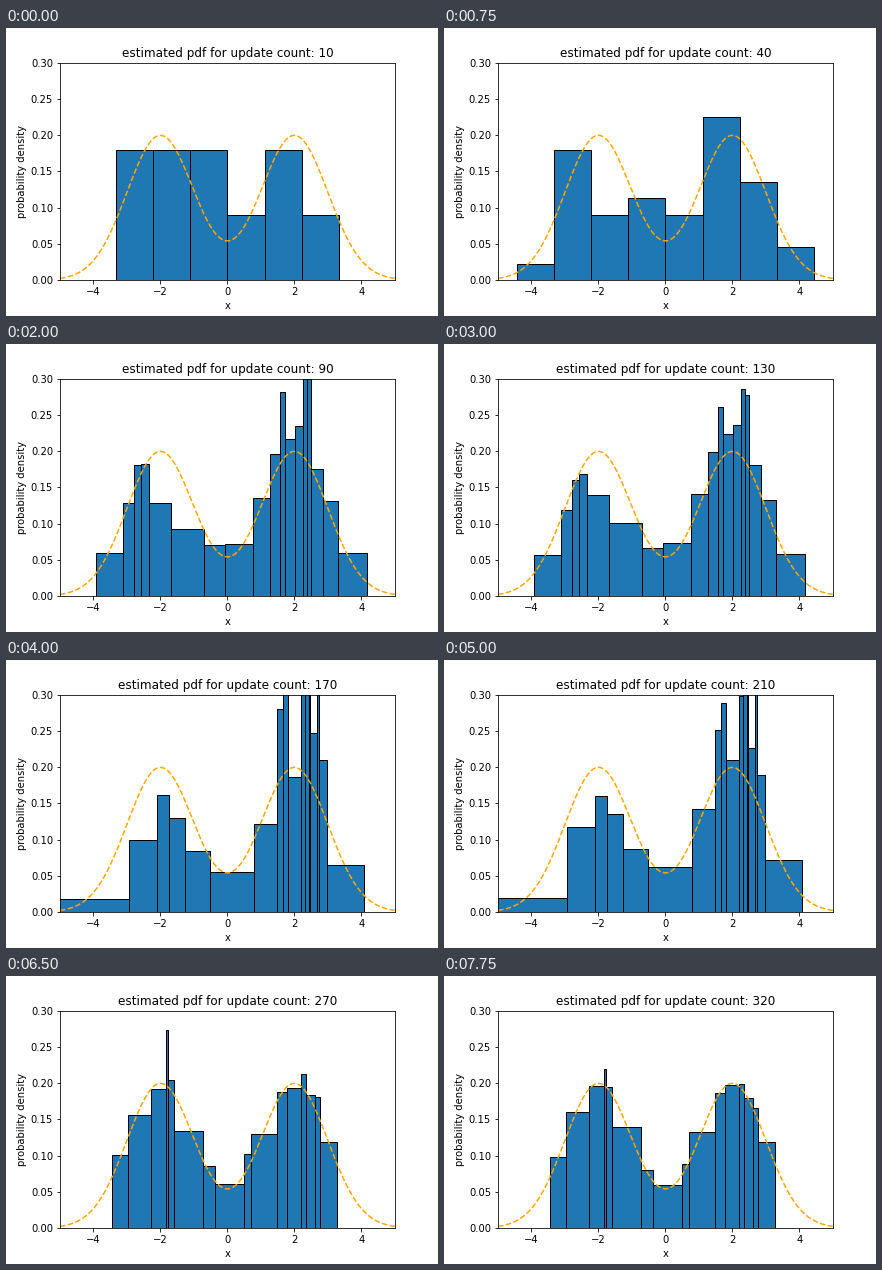
A matplotlib script for the animation above (8000 ms loop, 432 by 288 pixels).

```python
from math import erf, sqrt

import numpy as np
import matplotlib.pyplot as plt
from matplotlib.animation import FuncAnimation

STEP = 10
FRAMES = 32

plt.rcParams.update({"font.family": "DejaVu Sans", "font.size": 10})

# Sample tallies in the uniform bins after 10 and after 40 updates.
UNIFORM = np.arange(-4, 5) * 10 / 9
EARLY = np.array([0, 2, 2, 2, 1, 2, 1, 0])
LATE = np.array([1, 8, 4, 5, 4, 10, 6, 2])

# Each rebinning: update count, share of the left hump, prior weight, edges.
STAGES = [
    (50, 0.4, 26, [-3.92, -3.11, -2.78, -2.57, -2.34, -1.68, -0.70, -0.07,
                   0.77, 1.27, 1.57, 1.72, 2.02, 2.26, 2.38, 2.50, 2.86,
                   3.30, 4.17]),
    (150, 0.4, 26, [-6.5, -2.93, -2.10, -1.74, -1.26, -0.52, 0.80, 1.48,
                    1.66, 1.80, 2.20, 2.33, 2.43, 2.47, 2.68, 2.74, 2.98,
                    4.08]),
    (250, 0.5, 2, [-3.44, -2.96, -2.28, -1.83, -1.77, -1.59, -0.73, -0.36,
                   0.50, 0.71, 1.48, 1.78, 2.20, 2.35, 2.61, 2.76, 3.28]),
]


def pdf(x, mean):
    return np.exp(-(x - mean) ** 2 / 2) / np.sqrt(2 * np.pi)


def cdf(x, mean):
    return np.array([(1 + erf((v - mean) / sqrt(2))) / 2 for v in x])


def uniform_density(count):
    tally = np.rint(EARLY + (LATE - EARLY) * (count - 10) / 30)
    return tally / (count * np.diff(UNIFORM))


def adaptive_density(edges, left, prior, hits):
    """Equal-mass bins that drift towards the two-hump distribution."""
    drawn = np.diff(left * cdf(edges, -2) + (1 - left) * cdf(edges, 2))
    even = 1 / (len(edges) - 1)
    return (prior * even + hits * drawn) / (prior + hits) / np.diff(edges)


def histogram(count):
    """Bin edges and densities after the given number of updates."""
    past = [stage for stage in STAGES if stage[0] < count]
    if not past:
        return UNIFORM, uniform_density(count)
    start, left, prior, edges = past[-1]
    return np.array(edges), adaptive_density(edges, left, prior, count - start)


fig, ax = plt.subplots(figsize=(6, 4), dpi=72)
fig.subplots_adjust(left=0.125, right=0.9, bottom=0.125, top=0.88)
x = np.linspace(-5, 5, 1000)
ax.plot(x, (pdf(x, -2) + pdf(x, 2)) / 2, "--", color="orange", lw=1.5)
ax.set(xlim=(-5, 5), ylim=(0, 0.3), xlabel="x", ylabel="probability density",
       xticks=range(-4, 5, 2), yticks=np.arange(7) * 0.05)
title = ax.set_title("", fontsize=12)
bars = []


def update(frame):
    while bars:
        bars.pop().remove()
    count = STEP * (frame + 1)
    edges, density = histogram(count)
    used = density > 0
    bars.extend(ax.bar(edges[:-1][used], density[used], np.diff(edges)[used],
                       align="edge", color="tab:blue", edgecolor="black", lw=1))
    ax.set(xlim=(-5, 5), ylim=(0, 0.3))
    title.set_text(f"estimated pdf for update count: {count}")
    return [*bars, title]


anim = FuncAnimation(fig, update, frames=FRAMES, interval=250,
                     init_func=lambda: update(0), repeat=True, repeat_delay=0)
plt.show()
```
